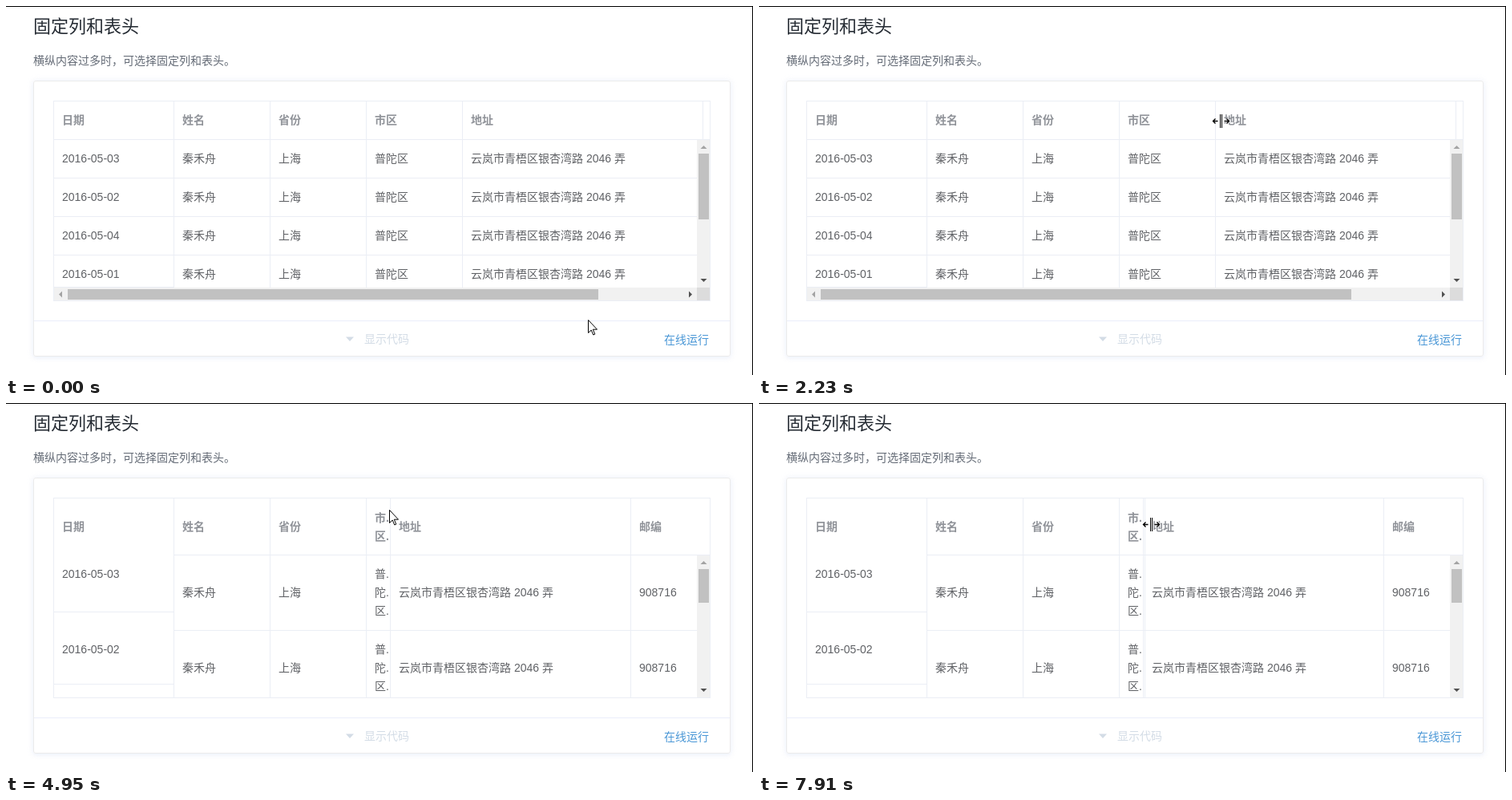
Animation of 932 by 460 pixels, one loop 7990 ms. Source, as an HTML page:

```html
<!DOCTYPE html>
<html lang="zh-CN">
<head>
<meta charset="utf-8">
<title>固定列和表头</title>
<style>
html, body { margin: 0; width: 100%; height: 100%; overflow: hidden; background: #fff; }
.card {
  position: absolute; left: 34px; top: 93px; width: 868px; height: 342px;
  border: 1px solid #ebebeb; border-radius: 3px;
  box-shadow: 0 0 8px rgba(232,237,250,.6), 0 2px 4px rgba(232,237,250,.5);
}
svg { position: absolute; left: 0; top: 0; display: block; }
rect { shape-rendering: crispEdges; }
text {
  font: 14px "Liberation Sans", "Noto Sans CJK SC", "Noto Sans CJK", sans-serif;
  fill: #606266; white-space: pre;
}
.head { font-weight: 700; fill: #909399; }
.title { font-size: 22px; fill: #252b33; }
.note { fill: #646b76; }
.code { fill: #d3dce6; }
.run { fill: #4a97d6; }
</style>
</head>
<body>
<div class="card"></div>
<svg id="stage" width="932" height="460" viewBox="0 0 932 460"></svg>
<script>
const LOOP = 7990, RELEASE = 4910, FADE = 250;
const LINE = '#ebeef5', TRACK = '#f1f1f1', THUMB = '#c1c1c1', DIM = '#a3a3a3', DARK = '#505050';
const NAME = '秦禾舟', ADDRESS = '云岚市青梧区银杏湾路 2046 弄', ZIP = '908716';
const LEFT = 59, PAD = 11;

const rect = (x, y, w, h, fill, extra = '') =>
  `<rect x="${x}" y="${y}" width="${w}" height="${h}" fill="${fill}" ${extra}/>`;
const hLine = (x1, x2, y) => rect(x1, y, x2 - x1, 1, LINE);
const vLine = (x, y1, y2) => rect(x, y1, 1, y2 - y1, LINE);
// y is the middle of the line of text
const text = (x, y, s, cls = '') => `<text x="${x}" y="${y + 5}" class="${cls}">${s}</text>`;
const tri = (x, y, turn, fill) =>
  `<path d="M-4 2H4L0 -2Z" transform="translate(${x} ${y}) rotate(${turn})" fill="${fill}"/>`;
const frame = () =>
  hLine(59, 879, 118) + hLine(59, 879, 367) + vLine(59, 118, 368) + vLine(878, 118, 368);
const tint = (x, y, w, h, row) => rect(x, y, w, h, '#f5f6fa', `data-row="${row}" opacity="0"`);

// left edges of columns with the given widths
const edges = widths => widths.reduce((all, w) => [...all, all[all.length - 1] + w], [LEFT]);

// a cell is one string, or a list of wrapped lines 23 px apart
function cells(cols, y, row, cls) {
  return row.map((cell, i) => {
    const lines = [].concat(cell);
    return lines.map((s, k) => text(cols[i] + PAD, y + (k - (lines.length - 1) / 2) * 23, s, cls)).join('');
  }).join('');
}

function scrollbar(top, bottom, thumb) {
  return rect(862, top, 17, bottom - top, TRACK) + rect(864, top + 17, 13, thumb, THUMB) +
    tri(870.5, top + 9, 0, DIM) + tri(870.5, Math.min(bottom - 9, 365), 180, DARK);
}

function page() {
  return rect(0, 0, 932, 1, '#000') + rect(931, 0, 1, 460, '#000') +
    `<text x="34" y="33" class="title">固定列和表头</text>` +
    text(34, 68, '横纵内容过多时，可选择固定列和表头。', 'note') +
    rect(35, 392, 868, 1, '#eaeefb') +
    `<path d="M424 412.5H434L429 418Z" fill="#d3dce6"/>` +
    text(447, 415, '显示代码', 'code') + text(821, 416, '在线运行', 'run');
}

function wideTable() {
  const cols = edges([150, 120, 120, 120]);
  let tints = '', body = '';
  [3, 2, 4, 1].forEach((day, i) => {
    const top = 167 + i * 48;
    tints += tint(60, top, 802, Math.min(47, 351 - top), i);
    body += hLine(60, i ? 862 : 878, top - 1) +
      cells(cols, top + 23, ['2016-05-0' + day, NAME, '上海', '普陀区', ADDRESS]);
  });
  return tints + cols.map(x => vLine(x, 118, 351)).join('') + vLine(869, 118, 167) + body +
    cells(cols, 142, ['日期', '姓名', '省份', '市区', '地址'], 'head') +
    hLine(60, 209, 350) + scrollbar(167, 351, 82) +
    rect(60, 351, 802, 17, TRACK) + rect(77, 353, 662, 13, THUMB) +
    tri(68, 359.5, -90, DIM) + tri(854, 359.5, 90, DARK) +
    rect(862, 351, 17, 17, '#dcdcdc') + frame();
}

function narrowTable() {
  const cols = edges([150, 120, 120, 30, 300]);
  let body = '';
  [3, 2].forEach((day, i) => {
    const y = 236 + i * 94;
    body += text(LEFT + PAD, y - 23, '2016-05-0' + day) +
      cells(cols.slice(1), y, [NAME, '上海', ['普.', '陀.', '区.'], ADDRESS, ZIP]);
  });
  return tint(61, 167, 148, 93, 'top') + tint(210, 190, 652, 93, 'top') +
    cols.map(x => vLine(x, 118, 367)).join('') +
    hLine(210, 878, 189) + hLine(210, 862, 283) + hLine(60, 209, 260) + hLine(60, 209, 350) +
    cells(cols, 154, ['日期', '姓名', '省份', ['市.', '区.'], '地址', '邮编'], 'head') +
    body + scrollbar(190, 367, 42) + frame();
}

function pointers() {
  const arm = 'M4 0H10M7 -3L10 0L7 3';
  const arms = style => [0, 180].map(turn =>
    `<path d="${arm}" transform="translate(.5 .5) rotate(${turn})" fill="none" ${style}/>`).join('');
  return `<path id="arrow" d="M.5 .5V16.5L4.2 13L6.8 19L8.8 18.1L6.3 12.2H11.5Z" fill="#fff" stroke="#000"/>
    <g id="resize">${rect(-2, -8, 5, 17, '#fff')}${arms('stroke="#fff" stroke-width="3"')}
    ${arms('stroke="#000" stroke-width="1.4"')}
    ${rect(-1, -8, 1, 17, '#000')}${rect(1, -8, 1, 17, '#000')}</g>`;
}

const stage = document.getElementById('stage');
stage.innerHTML = page() +
  `<g id="wide">${wideTable()}</g><g id="narrow">${narrowTable()}</g>` +
  `<rect id="guide" y="118" width="1" height="249" fill="${LINE}"/>` + pointers();
const el = id => document.getElementById(id);
const tints = [...document.querySelectorAll('[data-row]')];

// each stroke slows down towards its end: from ms, to ms, x, y, pointer
const strokes = [
  [0, 0, 726, 391, 'arrow'],
  [40, 810, 588, 182, 'arrow'],
  [850, 1300, 583, 147, 'arrow'],
  [1300, 1620, 581, 145, 'resize'],
  [2230, 2230, 576, 143, 'resize'],
  [2590, 2590, 573, 143, 'resize'],
  [2880, 4340, 483, 143, 'resize'],
  [RELEASE, RELEASE, 478, 133, 'arrow'],
  [5550, 6040, 455, 243, 'arrow'],
  [6280, 6690, 441, 231, 'arrow'],
  [6900, 7180, 474, 147, 'arrow'],
  [7420, 7500, 488, 151, 'resize'],
  [7780, 7910, 489, 151, 'resize']
];

function pointer(t) {
  let x = 0, y = 0, kind = 'arrow';
  for (const [from, to, tx, ty, shape] of strokes) {
    if (t < from) break;
    const left = t < to ? 1 - (t - from) / (to - from) : 0;
    const k = 1 - left * left;
    x += (tx - x) * k;
    y += (ty - y) * k;
    kind = shape;
  }
  return { x: Math.round(x), y: Math.round(y), kind };
}

function rowUnder(t) {
  const { y } = pointer(Math.max(0, t));
  if (t >= RELEASE) return y >= 190 && y < 283 ? 'top' : '';
  return y >= 167 && y < 351 ? String(Math.floor((y - 167) / 48)) : '';
}

// strength of a row's tint: share of the last FADE ms spent over it
function strength(row, t) {
  const n = 25;
  let hits = 0;
  for (let i = 0; i < n; i++) hits += rowUnder(t - i * FADE / n) === row;
  return hits / n;
}

const show = (node, on) => node.setAttribute('visibility', on ? 'visible' : 'hidden');

function draw(t) {
  const narrow = t >= RELEASE;
  show(el('wide'), !narrow);
  show(el('narrow'), narrow);
  tints.forEach(r => r.setAttribute('opacity', strength(r.dataset.row, t)));

  const { x, y, kind } = pointer(t);
  ['arrow', 'resize'].forEach(id => show(el(id), id === kind));
  el(kind).setAttribute('transform', `translate(${x} ${y})`);

  show(el('guide'), (t >= 2590 && !narrow) || t >= 7780);
  el('guide').setAttribute('x', Math.max(479, x - (narrow ? 8 : 4)));
}

const start = performance.now();
function tick() {
  draw((performance.now() - start) % LOOP);
  requestAnimationFrame(tick);
}
tick();
</script>
</body>
</html>
```
